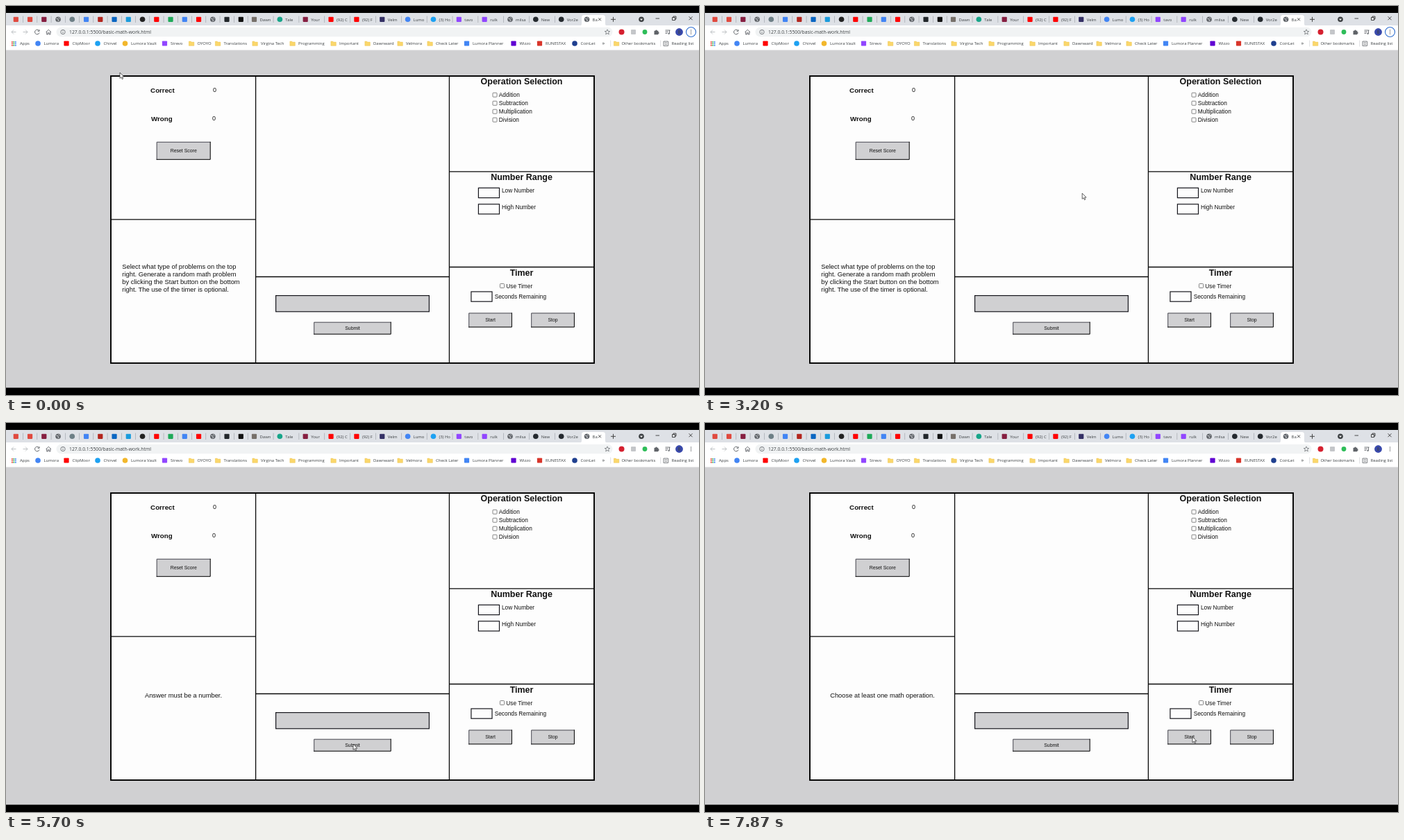
An HTML page for the animation above (8000 ms loop, 998x561 px).

```html
<!DOCTYPE html>
<html lang="en">
<head>
<meta charset="utf-8">
<title>Basic Math</title>
<style>
html, body { margin: 0; width: 100%; height: 100%; overflow: hidden; background: #000; }
svg { display: block; width: 998px; height: 561px; }
.page { font-family: "Liberation Sans", Arial, sans-serif; fill: #111; }
.ui { font-family: "Open Sans", "Noto Sans", sans-serif; fill: #3c4043; }
</style>
</head>
<body>
<svg id="stage" viewBox="0 0 998 561" xmlns="http://www.w3.org/2000/svg"></svg>
<script>
const NS = "http://www.w3.org/2000/svg";
const stage = document.getElementById("stage");
const GRAY = "#d0d0d2", INK = "#5f6368", LOOP = 8000;

function add(tag, attrs, parent = stage, content) {
  const el = document.createElementNS(NS, tag);
  for (const k in attrs) el.setAttribute(k, attrs[k]);
  if (content !== undefined) el.textContent = content;
  parent.appendChild(el);
  return el;
}
const rect = (x, y, width, height, fill, more = {}) => add("rect", { x, y, width, height, fill, ...more });
const dot = (cx, cy, r, fill, more = {}) => add("circle", { cx, cy, r, fill, ...more });
const path = (d, stroke = INK, w = 1, fill = "none", parent = stage) =>
  add("path", { d, stroke, "stroke-width": w, fill }, parent);
const text = (s, x, y, size, more = {}, parent = stage) =>
  add("text", { x, y, "font-size": size, class: "page", ...more }, parent, s);
const ui = (s, x, y, size = 5.95, more = {}) => text(s, x, y, size, { class: "ui", ...more });
const MID = { "text-anchor": "middle" };
const BOLD = { ...MID, "font-weight": "bold" };

function globe(x, y) {
  dot(x, y, 3.8, INK);
  path(`M${x - 2.6} ${y - 1.2}l2.4 .6l.6 1.8M${x + .6} ${y - 2.6}l1.6 1.4M${x - .6} ${y + 2.4}l2-1`, "#e4e6ea", .9);
}
function icon(kind, x, y) {
  if (kind === "globe") globe(x, y);
  else if (kind[0] === "o") dot(x, y, 3.8, kind.slice(1));
  else rect(x - 3.6, y - 3.6, 7.2, 7.2, kind, { rx: .8 });
}
function folder(x) {
  path(`M${x - 3.6} 51h2.7l1 1.1h3.7v5.2h-7.4z`, "#e8c14f", .5, "#fbd76b");
}

// Browser window
rect(0, 10, 998, 18.5, "#dee1e6");
rect(0, 28, 998, 36, "#fff");
rect(0, 64, 998, 486.5, GRAY);
rect(0, 63.4, 998, .7, "#dcdde0");

// Tabs
const small = ["#e04a3f", "#e04a3f", "#861f41", "globe", "o#6d7f86", "#4285f4", "#b3261e", "#0a66c2", "#1a9bdc",
  "o#222", "#f00", "#1faa59", "#4285f4", "#f00", "globe", "#22272b", "#111"];
small.forEach((kind, i) => {
  const x = 14.3 + 20.25 * i;
  icon(kind, x, 19.3);
  if (i) rect(x - 10.3, 14.5, .6, 9.5, "#9a9ea5");
});
const wide = [["#77706a", "Dawn"], ["o#17a589", "Tale"], ["#861f41", "Your"], ["#f00", "(92) C"], ["#f00", "(92) F"],
  ["#343065", "Velm"], ["o#4285f4", "Lumo"], ["o#1da1f2", "(3) Ho"], ["#9146ff", "tavo"], ["#9146ff", "rulk"],
  ["globe", "milsa"], ["o#24292e", "New"], ["o#24292e", "Vor2e"], ["globe", "Ba"]];
path("M826 28.5q3 0 3-3v-9q0-3.5 3.5-3.5h27q3.500 0 3.500 3.500v9q0 3 3 3z", "none", 0, "#fff");
wide.forEach(([kind, name], j) => {
  const x = 357.5 + 36.85 * j;
  icon(kind, x, 19.3);
  ui(name, x + 8, 21.5);
  if (j < 13) rect(x - 9.6, 14.5, .6, 9.5, "#9a9ea5");
});
path("M853 17.300l4 4m0-4l-4 4", "#444", .9);
path("M871 19.300h7m-3.500-3.500v7", "#444", 1);
dot(915, 19.300, 3.8, "#3c4043");
path("M913 18.400h4l-2 2.500z", "none", 0, "#fff");
path("M935.500 18h5.500M983.500 15.200l5 5m0-5l-5 5M959.500 16.500h4v4h-4zM961 16.500v-1.500h4v4h-1.500", "#222", .8);

// Toolbar
path("M14.500 37.500h-6.500m3-3l-3 3l3 3M24.500 37.500h6.500m-3-3l3 3l-3 3", "#b8bbbf", .9);
path("M47.300 35.300a3.300 3.300 0 1 0 .7 3.200M48 34v2.300h-2.400", INK, 1);
path("M57.500 37.700l3.800-3.500l3.800 3.500M58.700 37v4h1.700v-2.300h1.800v2.300h1.700v-4", INK, .9);
rect(72.500, 30.800, 801, 13.400, "#f1f3f4", { rx: 6.7 });
dot(82, 37.500, 3.2, "none", { stroke: INK, "stroke-width": .8 });
path("M82 37v2.200M82 35.400v.8", INK, .8);
ui("127.0.0.1:5500/basic-math-work.html", 91, 40, 6.8, { fill: "#202124" });
path("M866 33.800l1 2.500l2.700.2l-2.100 1.700l.7 2.600l-2.300-1.400l-2.300 1.400l.7-2.600l-2.100-1.700l2.700-.2z", INK, .7);
dot(886.500, 37.500, 4, "#d5202f");
rect(900, 34, 7, 7, "#c4c6c9", { rx: 1 });
dot(920, 37.500, 3.4, "#2ebd59");
path("M933.500 35.800h1.700a1.300 1.300 0 0 1 2.600 0h1.600v1.700a1.200 1.200 0 0 1 0 2.400v1.300h-5.900z", "none", 0, INK);
path("M949.500 35h7M949.500 37.200h4.200M949.500 39.400h3M955.500 35v4.500", INK, .9);
dot(954.600, 39.800, 1.1, INK);
dot(969.500, 37.500, 5.4, "#3949ab");
ui("B", 969.5, 39.800, 6.2, { ...MID, fill: "#fff" });
const ring = dot(986.500, 37.500, 7, "#fff", { stroke: "#2f6fd0", "stroke-width": 1.1 });
[-2.600, 0, 2.600].forEach(d => dot(986.500, 37.500 + d, .75, INK));

// Bookmarks
const appColors = ["#ea4335", "#34a853", "#4285f4"];
for (let i = 0; i < 9; i++) rect(8 + i % 3 * 2.500, 51 + Math.floor(i / 3) * 2.500, 1.700, 1.700, appColors[i % 3]);
ui("Apps", 20, 56.300);
const marks = [["o#4285f4", 46, "Lumora"], ["#f00", 87, "ClipMoor"], ["o#1da1f2", 132, "Chirvel"],
  ["o#f2b72b", 171.500, "Lumora Vault"], ["#9146ff", 228.500, "Strevo"], ["", 267, "OYOYO"], ["", 305, "Translations"],
  ["", 358.500, "Virgina Tech"], ["", 412.500, "Programming"], ["", 471.500, "Important"], ["", 520.500, "Dawnward"],
  ["", 567.500, "Velmora"], ["", 610.500, "Check Later"], ["#4285f4", 663.500, "Lumora Planner"],
  ["#6001d2", 731, "Wizzo"], ["#d8352a", 768.500, "RUNESTAX"], ["o#1f3f8f", 819, "CoinLet"]];
marks.forEach(([kind, x, name]) => {
  kind ? icon(kind, x, 54) : folder(x);
  ui(name, x + 8.500, 56.300);
});
ui("»", 858.500, 56.200, 7.500);
rect(870.500, 49.500, .6, 9, "#c8cace");
folder(879);
ui("Other bookmarks", 886.500, 56.300);
rect(942.500, 49.500, .6, 9, "#c8cace");
path("M947 51h6.500v6.500h-6.500zM948.500 53h3.500M948.500 55.300h3.500", INK, .8);
ui("Reading list", 958.500, 56.300);

// Math page
rect(151, 101, 696, 414, "#fdfdfd", { stroke: "#080808", "stroke-width": 2 });
path("M359.600 101V515M638.400 101V515M151 307.800H360M360 390.500H638M638 238.800H847M638 376.500H847", "#080808", 1.300);

function button(label, x, y, w, h) {
  rect(x, y, w, h, GRAY);
  const tl = path(`M${x + .5} ${y + h}V${y + .5}H${x + w}`);
  const br = path(`M${x} ${y + h - .5}H${x + w - .5}V${y}`);
  text(label, x + w / 2, y + h / 2 + 2.400, 6.930, MID);
  return down => {
    tl.setAttribute("stroke", down ? "#000" : "#4c4c55");
    br.setAttribute("stroke", down ? "#4c4c55" : "#000");
  };
}
function box(x, y, w, h, fill = "#fdfdfd") {
  rect(x + .6, y + .6, w - 1.200, h - 1.200, fill, { stroke: "#16161c", "stroke-width": 1.200 });
}
function check(label, x, y) {
  rect(x - 3, y - 3, 6, 6, "#fff", { rx: .8, stroke: "#666", "stroke-width": .8 });
  text(label, x + 5.800, y + 3.200, 8.320);
}

text("Correct", 225.400, 125, 9.730, BOLD);
text("0", 300.600, 124, 9, MID);
text("Wrong", 224.400, 165.500, 9.730, BOLD);
text("0", 299.400, 164.500, 9, MID);
button("Reset Score", 216.700, 195.800, 78, 26)(false);

text("Operation Selection", 742.500, 113.300, 12.480, BOLD);
["Addition", "Subtraction", "Multiplication", "Division"].forEach((s, i) => check(s, 704, 128.200 + 12 * i));
text("Number Range", 742.500, 251.200, 12.480, BOLD);
box(679.800, 261.800, 31.300, 15.400);
text("Low Number", 714, 269.300, 8.320);
box(679.800, 285.200, 31.300, 15.400);
text("High Number", 714, 292.700, 8.320);
text("Timer", 742.500, 388.800, 12.480, BOLD);
check("Use Timer", 714.500, 403.500);
box(669.300, 411.400, 31.300, 15.400);
text("Seconds Remaining", 703.700, 421.700, 8.320);

box(388, 417, 222, 24.400, GRAY);
const submit = button("Submit", 443.200, 455.700, 111.500, 18);
const start = button("Start", 666.200, 442.500, 62.700, 21);
button("Stop", 756.200, 442.500, 62.700, 21)(false);

const intro = add("g", {});
["Select what type of problems on the top", "right. Generate a random math problem",
  "by clicking the Start button on the bottom", "right. The use of the timer is optional."]
  .forEach((s, i) => text(s, 167.300, 379.300 + 10.850 * i, 9.360, {}, intro));
const message = text("", 255.500, 395.800, 9.360, MID);

// Pointer
const arrow = path("M0 0V8.300L1.900 6.600L3.300 9.600L4.600 9L3.300 6.100H5.900Z", "#222", .7, "#fff");
const beam = path("M-1.500-3.500H1.500M0-3.500V3.500M-1.500 3.500H1.500", "#333", .8);

const keys = [[0, 164, 96], [30, 164, 96], [400, 250, 165], [730, 250, 165], [970, 438.700, 166], [1300, 640, 175],
  [1500, 640, 175], [1930, 649.600, 294], [2230, 626, 283], [2499, 626, 283], [2500, 543, 269], [3000, 543, 269],
  [3200, 543.200, 270], [3670, 512, 375], [4000, 512, 375], [4400, 506, 429], [4770, 506, 429], [5000, 506, 445.500],
  [5230, 500, 463], [6000, 500, 463], [6230, 522, 426], [6430, 522, 426], [6600, 531.200, 408.500],
  [6730, 545, 403], [6900, 545, 403], [7530, 702, 452.500], [LOOP, 702, 452.500]];

const slope = (i, c) => keys[i] && keys[i + 1] ? (keys[i + 1][c] - keys[i][c]) / (keys[i + 1][0] - keys[i][0]) : 0;
// Monotone tangent: stops at rests and turns, flows through the other keys
function tangent(i, c) {
  const a = slope(i - 1, c), b = slope(i, c);
  return a * b > 0 ? 2 * a * b / (a + b) : 0;
}
function along(t, c) {
  let i = 0;
  while (i < keys.length - 2 && t >= keys[i + 1][0]) i++;
  const p = keys[i], q = keys[i + 1], span = q[0] - p[0], u = (t - p[0]) / span;
  const s = u * u * (3 - 2 * u), r = u * (1 - u);
  return p[c] + (q[c] - p[c]) * s + span * r * ((1 - u) * tangent(i, c) - u * tangent(i + 1, c));
}

const show = (el, on) => el.setAttribute("visibility", on ? "visible" : "hidden");

function draw(t) {
  const x = along(t, 1), y = along(t, 2);
  const typing = x > 388 && x < 610 && y > 417 && y < 447;
  show(beam, typing);
  show(arrow, !typing);
  (typing ? beam : arrow).setAttribute("transform", `translate(${x.toFixed(2)} ${y.toFixed(2)})`);
  submit(t >= 5530 && t < 5630);
  start(t >= 7770 && t < 7830);
  ring.setAttribute("stroke", t < 5530 ? "#2f6fd0" : "none");
  show(intro, t < 5630);
  message.textContent = t < 5630 ? "" : t < 7830 ? "Answer must be a number." : "Choose at least one math operation.";
}

const begin = performance.now();
function tick() {
  draw((performance.now() - begin) % LOOP);
  requestAnimationFrame(tick);
}
tick();
</script>
</body>
</html>
```
